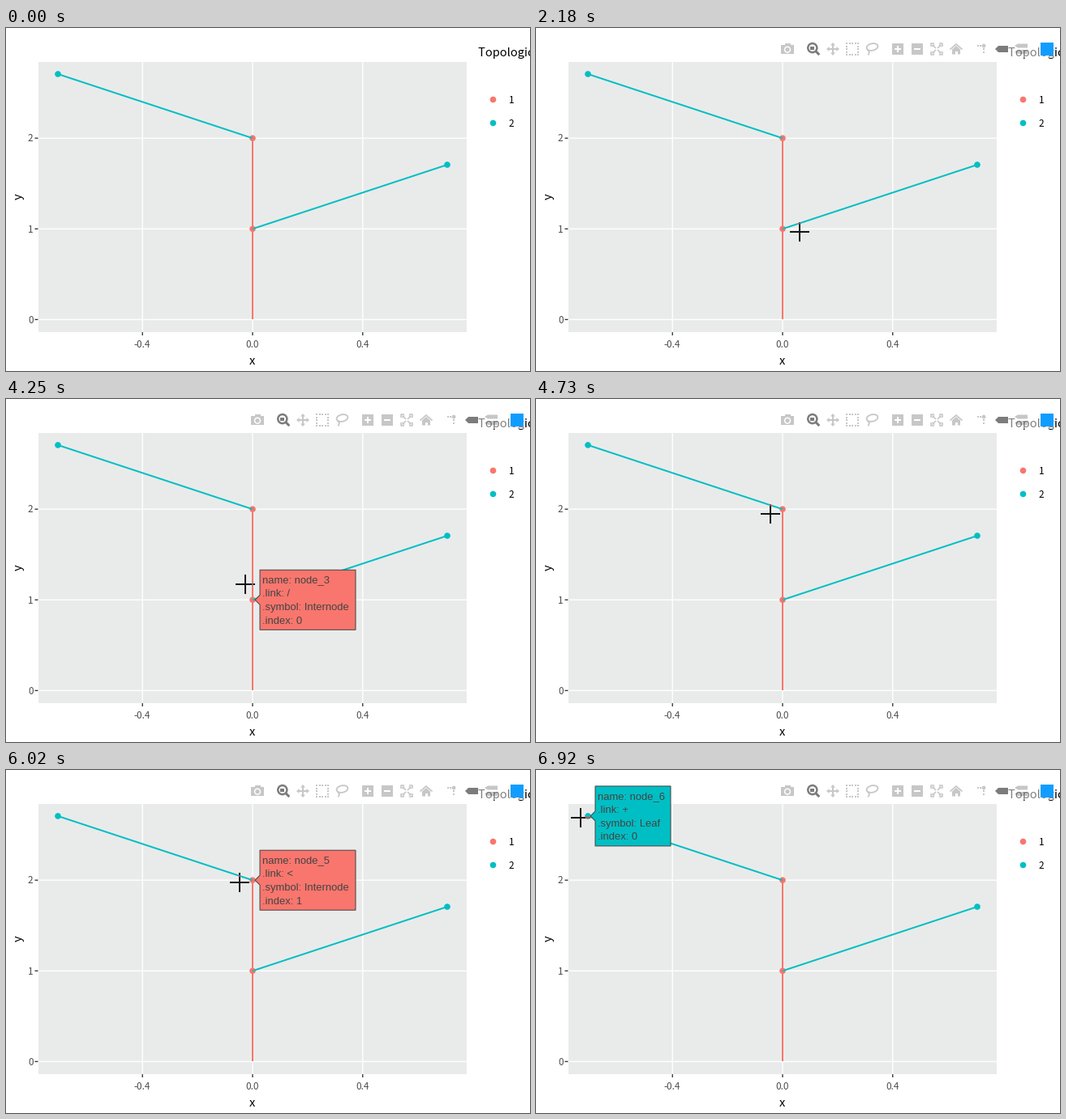
A matplotlib script that plays this animation: 646 by 424 pixels, repeating every 8 s.

```python
from itertools import count, product

import matplotlib.pyplot as plt
import numpy as np
from matplotlib.animation import FuncAnimation
from matplotlib.colors import to_rgb
from matplotlib.patches import Circle, Ellipse, Polygon

W, H, DPI = 646, 424, 100
LOOP, STEP = 8000, 20
PX = 72 / DPI

RED, TEAL, PANEL = "#F8766D", "#00BFC4", "#E9EBEA"
PALE, ACTIVE, INK, BLUE = "#C7C7C7", "#7C7C7C", "#444444", "#119DFF"
SANS, ARIAL = "Noto Sans CJK JP", "Liberation Sans"

fig = plt.figure(figsize=(W / DPI, H / DPI), dpi=DPI, facecolor="white")
ax = fig.add_axes([0, 0, 1, 1])
ax.set_xlim(0, W)
ax.set_ylim(H, 0)
ax.axis("off")
layer = count(1)


def at(u, v):
    """Data coordinates to pixels."""
    return np.array([304 + 339.4 * u, 360.4 - 112.1 * v])


def inverse(color):
    return tuple(1 - np.array(to_rgb(color)))


def add(patch):
    patch.set_zorder(next(layer))
    return ax.add_patch(patch)


def poly(pts, fill, edge="none", **kw):
    return add(Polygon(pts, closed=True, facecolor=fill, edgecolor=edge,
                       linewidth=0 if edge == "none" else PX, **kw))


def rect(x, y, w, h, fill, **kw):
    """Rectangle given by its centre and size."""
    x0, x1, y0, y1 = x - w / 2, x + w / 2, y - h / 2, y + h / 2
    return poly([(x0, y0), (x1, y0), (x1, y1), (x0, y1)], fill, **kw)


def disc(x, y, r, fill):
    return add(Circle((x, y), r, facecolor=fill, edgecolor="none"))


def line(xs, ys, color, w=1.33, **kw):
    return ax.plot(xs, ys, color=color, lw=w * PX, solid_capstyle="butt",
                   zorder=next(layer), **kw)[0]


def text(x, y, s, size, color="black", font=SANS, **kw):
    return ax.text(x, y, s, fontsize=size * PX, color=color, family=font,
                   va="baseline", zorder=next(layer), **kw)


def strip(a, b, color, w=2.0):
    """Straight segment as a filled polygon."""
    d = (np.array(b) - a) / np.hypot(*(np.array(b) - a)) * w / 2
    n = np.array([-d[1], d[0]])
    return poly([a + n, b + n, b - n, a - n], color)


def plus(x, y, r=12, h=1):
    """Outline of an upright cross, built by quarter turns of one corner."""
    corner = np.array([(-r, -h), (-h, -h), (-h, -r)])
    turn = np.array([(0, 1), (-1, 0)])
    arms = [corner @ np.linalg.matrix_power(turn, k) for k in range(4)]
    return np.vstack(arms) + (x, y)


# Panel and axes
rect(304, 209, 528, 334, PANEL)
for u in (-0.4, 0, 0.4):
    x = at(u, 0)[0]
    line([x, x], [42, 376], "white", snap=False)
    line([x, x], [376, 380], "#333333", snap=False)
    text(x - 0.3, 395, f"{u:.1f}", 11.7, "#4D4D4D", ha="center")
for v in range(3):
    y = at(0, v)[1]
    line([40, 568], [y, y], "white", snap=False)
    line([35.5, 39.5], [y, y], "#333333", snap=False)
    text(33.5, y + 4.3, str(v), 11.7, "#4D4D4D", ha="right")
text(303.5, 416, "x", 14.6, ha="center")
text(19.5, 208, "y", 14.6, ha="center", rotation=90, rotation_mode="anchor")

# Branching structure
S = 0.5 ** 0.5
ROOT, LOW, TOP = at(0, 0), at(0, 1), at(0, 2)
LEFT, RIGHT = at(-S, 2 + S), at(S, 1 + S)
shapes = [strip(ROOT, TOP, RED)]
shapes += [disc(*p, 3.8, RED) for p in (LOW, TOP)]
shapes += [strip(TOP, LEFT, TEAL), strip(LOW, RIGHT, TEAL)]
shapes += [disc(*p, 3.8, TEAL) for p in (LEFT, RIGHT)]

# Legend
title = text(582, 35, "Topological order", 14.6)
title.set_clip_path(Polygon([(0, 0), (644, 0), (644, H), (0, H)],
                            transform=ax.transData))
for i, color in enumerate((RED, TEAL)):
    y = 88.5 + 29 * i
    disc(600.5, y, 3.8, color)
    text(619.7, y + 4.5, str(i + 1), 11.7)


# Toolbar icons, each drawn around its centre
def camera(x, y):
    return [rect(x, y + 0.7, 16, 11.5, PALE), rect(x, y - 6, 7, 2, PALE),
            disc(x, y + 0.7, 4.2, "white"), disc(x, y + 0.7, 2.7, PALE)]


def magnifier(x, y):
    x, y = x - 1.2, y - 1.4
    return [disc(x, y, 6.8, ACTIVE), disc(x, y, 4.3, "white"),
            rect(x, y, 5, 4.2, ACTIVE),
            strip((x + 4, y + 4), (x + 8.5, y + 8.5), ACTIVE, 3)]


def pan(x, y):
    heads = [poly([(x + 8 * a, y + 8 * b),
                   (x + 4.5 * a + 3 * b, y + 4.5 * b + 3 * a),
                   (x + 4.5 * a - 3 * b, y + 4.5 * b - 3 * a)], PALE)
             for a, b in ((1, 0), (-1, 0), (0, 1), (0, -1))]
    return heads + [poly(plus(x, y, 6), PALE)]


def select(x, y):
    grid = np.linspace(-7, 7, 5)
    return [rect(x + a, y + b, 2, 2, PALE) for a, b in product(grid, grid)
            if max(abs(a), abs(b)) == 7]


def lasso(x, y):
    loop = Ellipse((x + 0.5, y - 2.5), 14, 8.5, angle=-12, fill=False,
                   edgecolor=PALE, linewidth=1.8 * PX)
    return [add(loop), line([x - 5, x - 3, x - 4.5], [y + 1, y + 4, y + 7.5],
                            PALE, 1.7)]


def zoom_out(x, y):
    return [rect(x, y, 14, 14, PALE), rect(x, y, 8, 2, "white")]


def zoom_in(x, y):
    return zoom_out(x, y) + [rect(x, y, 2, 8, "white")]


def autoscale(x, y):
    parts = []
    for a, b in product((-1, 1), repeat=2):
        parts += [line([x + 7.2 * a, x + 7.2 * a, x + 3 * a],
                       [y + 3 * b, y + 7.2 * b, y + 7.2 * b], PALE, 1.6),
                  line([x + a, x + 5 * a], [y + b, y + 5 * b], PALE, 1.6),
                  poly([(x + 5.5 * a, y + 5.5 * b), (x + 2 * a, y + 5.5 * b),
                        (x + 5.5 * a, y + 2 * b)], PALE)]
    return parts


def home(x, y):
    return [line([x - 7.5, x, x + 7.5], [y + 0.5, y - 6, y + 0.5], PALE, 1.7),
            poly([(x - 5, y + 0.5), (x, y - 4), (x + 5, y + 0.5),
                  (x + 5, y + 6.5), (x - 5, y + 6.5)], PALE),
            rect(x, y + 4.5, 3, 4, "white")]


def spikes(x, y):
    dots = [rect(x + 2 - 3.6 * k, y - 4, 2, 2, PALE) for k in (1, 2)]
    dots += [rect(x + 2, y - 4 + 4 * k, 2, 2, PALE) for k in (1, 2)]
    return dots + [disc(x + 2, y - 4, 2.4, PALE)]


def tag(x, y, h, fill, **kw):
    return poly([(x - 8, y), (x - 4, y - h / 2), (x + 8, y - h / 2),
                 (x + 8, y + h / 2), (x - 4, y + h / 2)], fill, **kw)


def closest(x, y):
    return [tag(x, y, 8, ACTIVE)]


def compare(x, y):
    return [tag(x, y + d, 5, INK, alpha=0.3) for d in (-4, 3.5)]


def logo(x, y):
    return [rect(x, y, 16, 16, BLUE)]


GROUPS = [[camera], [magnifier, pan, select, lasso],
          [zoom_in, zoom_out, autoscale, home],
          [spikes, closest, compare], [logo]]
bar = [rect(469, 26, 342, 22, "white", alpha=0.5)]
slot = count()
for g, group in enumerate(GROUPS):
    for icon in group:
        bar += icon(310 + 24 * next(slot) + 8 * g, 26)
bar = [(part, part.get_alpha() or 1) for part in bar]

# Hover label
box = poly([ROOT, LOW, RIGHT], RED, INK, snap=False)
rows = [text(0, 0, "", 13, INK, ARIAL) for _ in range(4)]

# The crosshair inverts whatever lies below it
cross = poly(plus(0, 0), inverse(PANEL))
negatives = [(poly(plus(0, 0), PANEL), shape) for shape in shapes + [box]]
arrow = poly(np.array([(0, 0), (0, 16), (4, 12.5), (6.5, 18.5), (9, 17.5),
                       (6.5, 11.5), (11.5, 11.5)]) + (393.5, 413.5),
             "white", "black")

# Pointer strokes: first and last step time, steps, start, end
STROKES = [
    (1550, 2030, 5, (388, 372), (355, 266)),
    (2180, 2600, 4, (325, 252), (307, 248)),
    (4250, 4370, 2, (295, 229), (244, 204)),
    (4490, 4730, 3, (258, 180), (289, 142)),
    (4880, 5000, 2, (299, 138), (302, 137)),
    (6020, 6270, 3, (288, 139), (197, 129)),
    (6410, 6650, 3, (153, 110), (90, 78)),
    (6800, 6920, 2, (62, 62), (55, 59)),
]

# Hover spans: start, end, anchor, node, link, symbol, index
HOVERS = [
    (2340, 2480, LOW, 4, "+", "Leaf", 0),
    (2480, 4370, LOW, 3, "/", "Internode", 0),
    (4880, 6140, TOP, 5, "<", "Internode", 1),
    (6800, LOOP, LEFT, 6, "+", "Leaf", 0),
]


def pointer(t):
    """Crosshair position, held between the steps of each stroke."""
    begun = [s for s in STROKES if s[0] <= t]
    if not begun:
        return None
    t0, t1, n, a, b = begun[-1]
    k = min(int((t - t0) / (t1 - t0) * (n - 1)), n - 1) / (n - 1)
    return np.round(np.array(a) + k * (np.array(b) - a))


def show_label(t):
    span = next((h for h in HOVERS if h[0] <= t < h[1]), None)
    for part in (box, *rows):
        part.set_visible(span is not None)
    if span is None:
        return
    (x, y), node, link, symbol, index = span[2:]
    leaf = symbol == "Leaf"
    x0, x1 = x + 9, x + (102 if leaf else 127)
    box.set_xy([(x + 3, y), (x0, y - 6), (x0, y - 37), (x1, y - 37),
                (x1, y + 37), (x0, y + 37), (x0, y + 6)])
    box.set_facecolor(TEAL if leaf else RED)
    lines = (f"name: node_{node}", f".link: {link}", f".symbol: {symbol}",
             f".index: {index}")
    for i, (row, s) in enumerate(zip(rows, lines)):
        row.set_text(s)
        row.set_position((x + 11.5, y - 20.8 + 16.7 * i))


def show_cross(spot):
    cross.set_visible(spot is not None)
    for part, shape in negatives:
        part.set_visible(spot is not None and shape.get_visible())
    if spot is None:
        return
    cross.set_xy(plus(*spot))
    for part, shape in negatives:
        part.set_xy(plus(*spot))
        part.set_facecolor(inverse(shape.get_facecolor()[:3]))
        part.set_clip_path(shape)


def draw(i):
    t = i * STEP + STEP / 2
    fade = np.clip(((t - 1550) // 120 + 1) / 3, 0, 1)
    for part, alpha in bar:
        part.set_visible(fade > 0)
        part.set_alpha(alpha * fade)
    show_label(t)
    show_cross(pointer(t))
    arrow.set_visible(1400 <= t < 1550)
    return []


anim = FuncAnimation(fig, draw, frames=LOOP // STEP, interval=STEP,
                     init_func=lambda: draw(0), repeat=True, repeat_delay=0)
plt.show()
```
